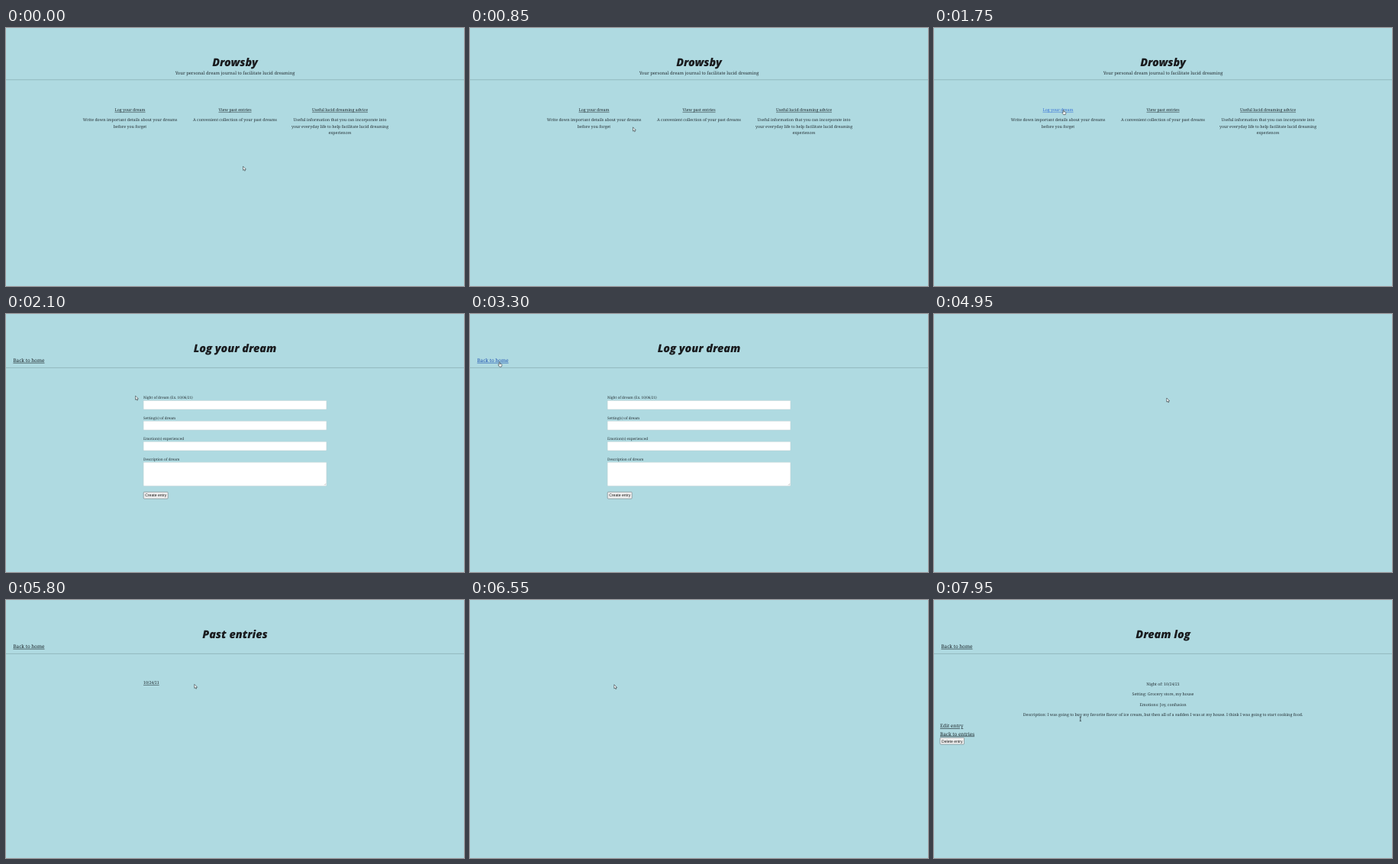
These frames come from a looping animation (600x338 px, 8 s). An HTML page:

```html
<!DOCTYPE html>
<html lang="en">
<head>
<meta charset="utf-8">
<title>Dream journal</title>
<style>
  html, body { margin: 0; width: 100%; height: 100%; overflow: hidden; background: #afdae1; }
  svg { display: block; width: 600px; height: 338px; }
  text { font-family: "Noto Serif", serif; font-size: 5.25px; fill: #263136; text-rendering: geometricPrecision; }
  .title { font: italic 800 14.4px "Open Sans", sans-serif; fill: #1a1c1f; }
  .sub { font-size: 5.82px; }
  .label { font-size: 4.7px; }
  .nav { font-size: 6.4px; }
  .link { text-decoration: underline; text-decoration-thickness: .6px; text-underline-offset: .8px; fill: #1c262b; }
  .link.hover { fill: #2f6bd6; }
  .nav.hover { fill: #1c50b0; }
  .btn { font: 5.1px "Liberation Sans", sans-serif; fill: #111; }
  .rule { stroke: #8bb0b7; stroke-width: .8; }
  .field { fill: #fff; stroke: #c3d0d3; stroke-width: .5; }
</style>
</head>
<body>
<svg id="stage" viewBox="0 0 600 338"></svg>
<script>
const LOOP = 8000, TICK = 50;
const stage = document.getElementById("stage");

function add(parent, tag, attrs = {}, content = "") {
  const el = document.createElementNS("http://www.w3.org/2000/svg", tag);
  for (const key in attrs) el.setAttribute(key, attrs[key]);
  el.textContent = content;
  return parent.appendChild(el);
}

const pages = {};
const links = [];

function page(name, title, ruleY) {
  const g = pages[name] = add(stage, "g");
  if (title) {
    mid(g, 300, 49.6, title, "title");
    add(g, "line", { x1: 0, x2: 600, y1: ruleY, y2: ruleY, class: "rule" });
  }
  return g;
}
function left(g, x, y, str, cls = "") {
  return add(g, "text", { x, y, class: cls }, str);
}
function mid(g, x, y, str, cls = "") {
  return add(g, "text", { x, y, class: cls, "text-anchor": "middle" }, str);
}
// box: left, top, right, bottom of the area that reacts to the pointer
function link(name, el, box) {
  el.classList.add("link");
  links.push({ name, el, box });
}
function button(g, x, y, w, str) {
  add(g, "rect", { x, y, width: w, height: 8.8, rx: 1, fill: "#efefef", stroke: "#707a7d", "stroke-width": .6 });
  mid(g, x + w / 2, y + 6.2, str, "btn");
}
function backHome(name) {
  link(name, left(pages[name], 9.4, 62.8, "Back to home", "nav"), [9, 56, 51, 66]);
}

const home = page("home", "Drowsby", 67.8);
mid(home, 300, 61, "Your personal dream journal to facilitate lucid dreaming", "sub");
[
  [162.5, 20, "Log your dream", ["Write down important details about your dreams", "before you forget"]],
  [300, 22, "View past entries", ["A convenient collection of your past dreams"]],
  [437.5, 37, "Useful lucid dreaming advice", ["Useful information that you can incorporate into",
    "your everyday life to help facilitate lucid dreaming", "experiences"]]
].forEach(([x, half, head, lines]) => {
  link("home", mid(home, x, 108.9, head), [x - half, 103, x + half, 111.5]);
  lines.forEach((line, i) => mid(home, x, 122.4 + i * 8.45, line));
});

const form = page("form", "Log your dream", 70.4);
backHome("form");
["Night of dream (Ex. 10/06/21)", "Setting(s) of dream", "Emotion(s) experienced", "Description of dream"]
  .forEach((label, i) => {
    const y = 111.3 + i * 26.95;
    left(form, 180, y, label, "label");
    add(form, "rect", { x: 180.1, y: y + 2.1, width: 239.8, height: i < 3 ? 11.6 : 31, rx: .8, class: "field" });
  });
add(form, "path", { d: "M417 224.2l2-2M418.2 224.2l.9-.9", stroke: "#888", "stroke-width": .4 });
button(form, 180.2, 233.2, 32, "Create entry");

const entries = page("entries", "Past entries", 70.4);
backHome("entries");
link("entries", left(entries, 180, 110.4, "10/24/21"), [179, 104, 204, 113]);

const log = page("log", "Dream log", 70.4);
backHome("log");
[
  "Night of: 10/24/21",
  "Setting: Grocery store, my house",
  "Emotions: Joy, confusion",
  "Description: I was going to buy my favorite flavor of ice cream, but then all of a sudden I was at my house. I think I was going to start cooking food."
].forEach((line, i) => mid(log, 300, 111.8 + i * 13.45, line));
link("log", left(log, 8, 167.2, "Edit entry", "nav"), [8, 161, 39, 170]);
link("log", left(log, 8, 177.5, "Back to entries", "nav"), [8, 171, 54, 180]);
button(log, 8, 180.3, 31.5, "Delete entry");

page("blank");

// Pointer shapes, hot spot at 0,0
const pointers = { arrow: add(stage, "g"), hand: add(stage, "g"), beam: add(stage, "g") };
const ink = { fill: "#fff", stroke: "#2b3438", "stroke-width": .6, "stroke-linejoin": "round" };
add(pointers.arrow, "path", { ...ink, d: "M0 0V5.2L1.2 4.2 2 6 2.9 5.6 2.2 3.9H3.8Z" });
add(pointers.hand, "path", { ...ink, d: "M-.5 .4Q0-.3 .5 .4V2.4L2.8 3Q3.4 3.3 3.2 4.4L2.6 6.3H0L-1.7 3.9Q-1.6 3.1-.5 3.8Z" });
add(pointers.beam, "path", { d: "M-1.1-2.8Q0-2.8 0-2.1 0-2.8 1.1-2.8M0-2.2V2.2M-1.1 2.8Q0 2.8 0 2.1 0 2.8 1.1 2.8",
  fill: "none", stroke: "#20282b", "stroke-width": .7 });

const views = [
  [0, "home"], [1950, "blank"], [2050, "form"], [3750, "blank"], [3900, "home"],
  [4950, "blank"], [5050, "entries"], [6500, "blank"], [6650, "log"]
];
// time, x, y
const path = [
  [0, 310.6, 181.2], [50, 311.3, 181.4], [150, 311.3, 181.4], [250, 312.3, 182],
  [500, 312.3, 182], [1050, 171, 107.5], [1700, 171, 107.5], [1750, 169.6, 107.2],
  [2700, 169.6, 107.2], [3300, 38.6, 62.8], [3850, 38.6, 62.8], [3950, 54.8, 65.8],
  [4400, 302, 108], [4550, 302, 108], [4650, 304.8, 110], [5550, 304.8, 110],
  [6050, 188.8, 110.8], [6650, 188.8, 110.8], [7050, 188.6, 156.4], [7250, 188.6, 156.4],
  [7400, 190.6, 156.4], [7800, 190.6, 156.4], [7950, 191.8, 155.9], [LOOP, 191.8, 155.9]
];

function pointAt(t) {
  const i = path.findIndex(p => p[0] > t);
  const [t0, x0, y0] = path[i - 1], [t1, x1, y1] = path[i];
  const u = (t - t0) / (t1 - t0), e = u * u * (3 - 2 * u);
  return [x0 + (x1 - x0) * e, y0 + (y1 - y0) * e];
}

function draw() {
  const t = Math.floor(performance.now() % LOOP / TICK) * TICK;
  const view = views.filter(v => v[0] <= t).pop()[1];
  const [x, y] = pointAt(t);
  let kind = view === "log" && y > 147 && y < 159 ? "beam" : "arrow";

  for (const { name, el, box } of links) {
    const over = name === view && x > box[0] && x < box[2] && y > box[1] && y < box[3];
    el.classList.toggle("hover", over);
    if (over) kind = "hand";
  }
  for (const name in pages) pages[name].style.display = name === view ? "" : "none";
  for (const name in pointers) pointers[name].style.display = name === kind ? "" : "none";
  pointers[kind].setAttribute("transform", `translate(${x} ${y})`);
  requestAnimationFrame(draw);
}
draw();
</script>
</body>
</html>
```
